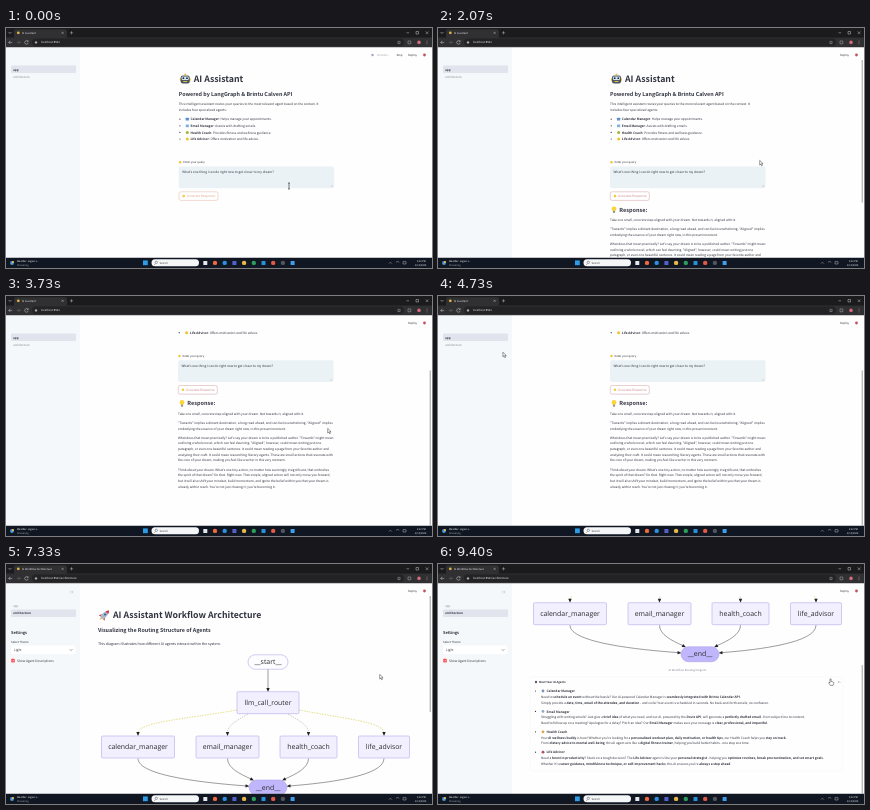
Write an HTML page with a canvas that moves like this. It is 426x240 px and loops after 9.47 s.

```html
<!DOCTYPE html>
<html lang="en">
<head>
<meta charset="utf-8">
<title>AI Assistant</title>
<style>
  html, body { margin: 0; width: 100%; height: 100%; overflow: hidden; background: #fff; }
  canvas { display: block; width: 426px; height: 240px; }
</style>
</head>
<body>
<canvas id="stage"></canvas>
<script>
const LOOP = 9470, STEP = 1000 / 15;
const LINE = 5.68, PARA = 9.2;
const BODY = 3.55, SMALL = 3.1, SUBHEAD = 6, TITLE = 9.76;
const INK = '#31333f', RED = '#ff4b4b', GREY = '#8a8c96';
const UI = '"Noto Sans CJK JP", "Noto Sans CJK SC", "Noto Sans CJK", "Noto Sans", sans-serif';
const GRAPH = '"Open Sans", "Noto Sans", sans-serif';

const canvas = document.getElementById('stage');
const ctx = canvas.getContext('2d');
const ratio = window.devicePixelRatio || 1;
canvas.width = 426 * ratio;
canvas.height = 240 * ratio;

// Moments, in ms
const ANSWER = 1400, OPEN_PAGE = 5100, DIAGRAM = 6400;
const LINK_HOVER = [4700, 6050], PANEL_HOVER = [9100, LOOP];

// Keys are [time, ...values]; values ease between neighbouring keys
const CURSOR = [[0, 283, 158], [700, 283, 158], [1700, 323, 135], [3900, 323, 135],
  [4800, 50, 54], [5950, 50, 54], [7000, 375, 113], [7400, 375, 113], [7900, 394, 118], [9470, 393, 118]];
const SCROLL_CHAT = [[2300, 0], [3400, 74.3]];
const SCROLL_GRAPH = [[7450, 0], [8200, 68], [8500, 68], [9250, 133.3]];

const within = ([from, to], t) => t >= from && t < to;

function at(keys, t) {
  const i = keys.findIndex(k => k[0] > t);
  if (i < 0) return keys[keys.length - 1].slice(1);
  if (i === 0) return keys[0].slice(1);
  const a = keys[i - 1], b = keys[i];
  const u = (t - a[0]) / (b[0] - a[0]), e = u * u * (3 - 2 * u);
  return a.slice(1).map((v, j) => v + (b[j + 1] - v) * e);
}

function rect(x, y, w, h, fill, r = 0, stroke, width = 0.5) {
  ctx.beginPath();
  ctx.roundRect(x, y, w, h, r);
  if (fill) { ctx.fillStyle = fill; ctx.fill(); }
  if (stroke) { ctx.strokeStyle = stroke; ctx.lineWidth = width; ctx.stroke(); }
}

function dot(x, y, r, fill) {
  ctx.beginPath();
  ctx.arc(x, y, r, 0, 7);
  ctx.fillStyle = fill;
  ctx.fill();
}

function path(d, stroke, width = 0.5, dash = []) {
  ctx.strokeStyle = stroke;
  ctx.lineWidth = width;
  ctx.setLineDash(dash);
  ctx.stroke(new Path2D(d));
  ctx.setLineDash([]);
}

function shape(d, fill) {
  ctx.fillStyle = fill;
  ctx.fill(new Path2D(d));
}

// Text centred on its cap height at y; **marks** switch bold
function text(str, x, y, size = BODY, { color = INK, bold = false, font = UI, center = false } = {}) {
  const px = (font === UI ? size * 0.895 : size) * 8;
  ctx.save();
  ctx.translate(x, y + size * 0.33);
  ctx.scale(1 / 8, 1 / 8);
  ctx.fillStyle = color;
  ctx.textRendering = 'geometricPrecision';
  ctx.textAlign = center ? 'center' : 'left';
  let offset = 0;
  str.split('**').forEach((part, i) => {
    ctx.font = `${bold || i % 2 ? 700 : 400} ${px}px ${font}`;
    ctx.fillText(part, offset, 0);
    offset += ctx.measureText(part).width;
  });
  ctx.restore();
}

function lines(list, x, y) {
  list.forEach((s, i) => text(s, x, y + i * LINE));
  return y + (list.length - 1) * LINE + PARA;
}

function robot(x, y) {
  rect(x - 5.5, y - 1.5, 11, 4, '#e8bd3c', 1.5);
  rect(x - 4.5, y - 3.5, 9, 8, '#4b5563', 2);
  rect(x - 3.6, y - 2.4, 7.2, 3.4, '#cfe6f2', 1.2);
  dot(x - 1.8, y - 0.8, 0.9, '#1d2533');
  dot(x + 1.8, y - 0.8, 0.9, '#1d2533');
  rect(x - 2, y + 2, 4, 1, '#e8bd3c');
  dot(x, y - 4.6, 1, '#e8bd3c');
}

function bulb(x, y) {
  dot(x, y - 0.9, 2.4, '#fbd43c');
  rect(x - 1.1, y + 1, 2.2, 2.3, '#9a9a8c', 0.4);
}

function rocket(x, y) {
  ctx.save();
  ctx.translate(x, y);
  ctx.rotate(Math.PI / 4);
  shape('M-2 1L-4 4L-2 4ZM2 1L4 4L2 4Z', '#d8344a');
  shape('M-1 4L0 7L1 4Z', '#f9b233');
  shape('M0-6.5C3-3 2.5 2 2 4.2H-2C-2.5 2-3-3 0-6.5Z', '#aab8c8');
  shape('M0-6.5C1-5.5 1.5-4.5 1.8-3.3H-1.8C-1.5-4.5-1-5.5 0-6.5Z', '#d8344a');
  dot(0, -0.8, 1.1, '#2f6fa8');
  ctx.restore();
}

function arrow(x, y, angle) {
  ctx.save();
  ctx.translate(x, y);
  ctx.rotate(angle);
  shape('M0 0L-4-1.7L-4 1.7Z', '#222');
  ctx.restore();
}

function browser(t) {
  const label = t < DIAGRAM ? 'AI Assistant' : 'AI Workflow Architecture';
  rect(0, 0, 426, 10, '#1b1b1d');
  rect(8, 1.2, 53, 9, '#303032', 2);
  rect(0, 9.5, 426, 9.8, '#303032');
  rect(26, 10.6, 372, 7.4, '#232325', 3.7);
  path('M2.5 4L4 5.5L5.5 4', '#ddd');
  dot(12.3, 4.8, 1.4, '#e3b341');
  text(label, 16, 4.8, 2.9, { color: '#eee' });
  path('M55.6 3.8l2 2m0-2l-2 2M65.5 3.2v3.2m-1.6-1.6h3.2', '#ddd', 0.4);
  path('M400.5 4.8h2.6M410 3.5h2.5v2.5h-2.5zM419.8 3.5l2.5 2.5m0-2.5l-2.5 2.5', '#eee', 0.4);
  path('M6.3 14.4H2.7m1.6-1.6l-1.6 1.6l1.6 1.6', '#ddd', 0.45);
  path('M10.6 14.4h3.6m-1.6-1.6l1.6 1.6l-1.6 1.6', '#777', 0.45);
  path('M22 13.4a1.8 1.8 0 1 0 .2 1.6M22.2 12.4v1.4h-1.4', '#ddd', 0.45);
  dot(30, 14.4, 1.2, '#aaa');
  text('localhost:8501' + (t < OPEN_PAGE ? '' : '/architecture'), 35, 14.4, SMALL, { color: '#eee' });
  path('M393 12.8l.5 1.2h1.2l-1 .8l.4 1.2l-1.1-.7l-1.1.7l.4-1.2l-1-.8h1.2z', '#ddd', 0.3);
  path('M402 13h2.8v2.8h-2.8z', '#ccc', 0.4);
  dot(413, 14.4, 1.8, '#d46a7c');
  for (const y of [12.9, 14.4, 15.9]) dot(421, y, 0.4, '#ddd');
}

function taskbar() {
  rect(0, 229.7, 426, 10.3, '#101722');
  dot(6, 235, 1.9, '#4a9be0');
  dot(7, 234, 1, '#f4c542');
  text('Weather: region a...', 11, 233.2, 2.7, { color: '#fff' });
  text('Streaming', 11, 236.7, 2.7, { color: '#aaa' });
  rect(137, 232.4, 4.8, 4.8, '#2c9be8');
  rect(145.5, 231.3, 47.5, 7, '#f4f6f7', 3.5);
  path('M149.5 235.6l-1.3 1.3M151.5 234.3a1.2 1.2 0 1 1-2.4 0a1.2 1.2 0 1 1 2.4 0', '#333', 0.4);
  text('Search', 153.5, 234.9, 3, { color: '#444' });
  const icons = ['#e4e8ec', '#f06a3a', '#2f8fe0', '#5560c8', '#e6b94a',
    '#2f9e5c', '#2a8fdc', '#e05a45', '#50565f', '#3fa0e8'];
  icons.forEach((c, i) => {
    const x = 199.3 + i * 9.7;
    if (i % 3) dot(x, 234.9, 2.2, c); else rect(x - 2, 232.9, 4, 4, c, 0.5);
  });
  path('M383 235.6l1.4-1.4l1.4 1.4M390 234.2q1.6-1.4 3.2 0M397 233.6h3v2.4h-3z', '#ddd', 0.4);
  text('5:22 PM', 411, 233.2, 2.7, { color: '#fff' });
  text('2/10/2025', 409, 236.7, 2.7, { color: '#fff' });
}

function sidebar(second) {
  rect(0, 19.3, 74, 210.4, '#f4f8fb');
  rect(5, second ? 45.6 : 37.6, 65, 7.4, '#e1e4ec', 1.2);
  text('app', 7, 41.5, 3.3, { bold: !second, color: second ? GREY : INK });
  text('architecture', 7, 49.4, 3.3, { bold: second, color: second ? INK : GREY });
  if (!second) return;
  path('M65.4 26.8l-1.2 1.2l1.2 1.2M67.2 26.8l-1.2 1.2l1.2 1.2', '#999', 0.4);
  text('Settings', 5, 69, 4.44, { bold: true });
  text('Select Theme', 5, 77.6, SMALL);
  rect(5, 81.5, 64.5, 8.8, '#fff', 1.6);
  text('Light', 8, 86);
  path('M63.8 85.3l1.3 1.3l1.3-1.3', INK, 0.45);
  rect(5.2, 94.8, 3.6, 3.6, RED, 0.7);
  path('M6 96.6l.8.8l1.3-1.6', '#fff', 0.5);
  text('Show Agent Descriptions', 11, 96.6, BODY);
}

function header(running) {
  if (running) {
    dot(366.5, 27, 1.2, '#9aa0c8');
    text('RUNNING...', 371, 27.2, 2.7, { color: '#a5a7ae' });
    text('Stop', 390.5, 27.2, SMALL);
  }
  text('Deploy', 402, 27.2, SMALL);
  dot(418.5, 27, 1.4, '#c4525e');
}

// Scrolling part of a page, hidden below the header
function scrolled(offset, height, draw) {
  ctx.save();
  ctx.beginPath();
  ctx.rect(74, 32, 352, 197.7);
  ctx.clip();
  if (height) {
    const k = 210.4 / (210.4 + height);
    rect(423.6, 19.3 + offset * k, 1.4, 210.4 * k, '#b9bbc2', 0.7);
  }
  ctx.translate(0, -offset);
  draw();
  ctx.restore();
}

const ABILITIES = [
  ['#5b8fd0', '**Calendar Manager**: Helps manage your appointments.'],
  ['#7fb2e0', '**Email Manager**: Assists with drafting emails.'],
  ['#a8b23a', '**Health Coach**: Provides fitness and wellness guidance.'],
  ['#f2c230', '**Life Advisor**: Offers motivation and life advice.']
];

const REPLY = [
  ['Take one small, concrete step aligned with your dream. Not towards it, aligned with it.'],
  ['"Towards" implies a distant destination, a long road ahead, and can feel overwhelming. "Aligned" implies',
    'embodying the essence of your dream right now, in this present moment.'],
  ['What does that mean practically? Let\'s say your dream is to be a published author. "Towards" might mean',
    'outlining a whole novel, which can feel daunting. "Aligned", however, could mean writing just one',
    'paragraph, or even one beautiful sentence. It could mean reading a page from your favorite author and',
    'analyzing their craft. It could mean researching literary agents. These are small actions that resonate with',
    'the core of your dream, making you feel like a writer in this very moment.'],
  ['Think about your dream. What\'s one tiny action, no matter how seemingly insignificant, that embodies',
    'the spirit of that dream? Do that. Right now. That simple, aligned action will not only move you forward,',
    'but it will also shift your mindset, build momentum, and ignite the belief within you that your dream is',
    'already within reach. You\'re not just chasing it; you\'re becoming it.']
];

function chatPage(answered) {
  const x = answered ? 172 : 172.7;
  robot(x + 6.5, 51);
  text('AI Assistant', x + 15, 51, TITLE, { bold: true });
  text('Powered by LangGraph & Brintu Calven API', x, 66, SUBHEAD, { bold: true });
  lines(['This intelligent assistant routes your queries to the most relevant agent based on the context. It',
    'includes four specialized agents:'], x, 75.7);
  ABILITIES.forEach(([color, label], i) => {
    const y = 91.2 + i * 6.6;
    dot(x + 1.2, y, 0.6, INK);
    if (i < 2) rect(x + 7, y - 1.4, 3.2, 2.8, color, 0.4); else dot(x + 8.6, y, 1.5, color);
    text(label, x + 11.8, y);
  });
  dot(x + 1.5, 134.3, 1.2, '#f2c230');
  text('Enter your query', x + 4.5, 134.3, SMALL);
  rect(x, 138.5, 155.5, 21.7, '#eaf2f6', 1.8);
  text("What's one thing I can do right now to get closer to my dream?", x + 3.5, 144.3);
  path(`M${x + 152} 159l2-2M${x + 153.2} 159l.8-.8`, '#999', 0.3);
  const tint = answered ? '#c9878c' : '#e0a08c';
  rect(x + 0.3, 163.8, 39, 8.6, '#fff', 1.8, tint, 0.4);
  dot(x + 5, 168.1, 1.3, '#f2c84a');
  text('Generate Response', x + 8, 168.1, BODY, { color: tint });
  if (!answered) return;
  bulb(x + 4, 181.7);
  text('Response:', x + 9.2, 181.7, 6.2, { bold: true });
  REPLY.reduce((y, para) => lines(para, x, y), 191.8);
}

function node(label, cx, cy, w, h, fill, r = 1.2) {
  rect(cx - w / 2, cy - h / 2, w, h, fill, r, '#a898e4', 0.5);
  text(label, cx, cy, 6.9, { font: GRAPH, center: true, color: '#2b2b2b' });
}

function diagram() {
  const dash = [1.4, 1.2], dark = '#3a3a3a';
  path('M262 105V126', dark);
  path('M231 146C180 155 132 158 132 169M293 146C340 155 378 158 378 169', '#d6cc40', 0.65, dash);
  path('M242 150C228 158 221.5 162 221.5 169M282 150C296 158 302.5 162 302.5 169', '#a5a39a', 0.6, dash);
  path('M132 194.5C132 212 200 219 241 222M378 194.5C378 212 322 219 283 222', dark);
  path('M221.5 194.5C221.5 204 234 210 245 215M302.5 194.5C302.5 204 290 210 279 215', dark);
  arrow(262, 128, Math.PI / 2);
  for (const x of [132, 221.5, 302.5, 378]) arrow(x, 172, Math.PI / 2);
  arrow(243.5, 222.2, 0.08);
  arrow(280.5, 222.2, Math.PI - 0.08);
  arrow(248, 216.5, 0.45);
  arrow(276, 216.5, Math.PI - 0.45);
  node('__start__', 262, 98, 40, 14.5, '#fdfcff', 7.2);
  node('llm_call_router', 262, 138.7, 62, 22, '#f2f0ff');
  node('calendar_manager', 132, 183, 73, 22, '#f2f0ff');
  node('email_manager', 221.5, 183, 63, 22, '#f2f0ff');
  node('health_coach', 302.5, 183, 57, 22, '#f2f0ff');
  node('life_advisor', 378, 183, 51, 22, '#f2f0ff');
  node('__end__', 262, 223.5, 38, 15, '#bfb6fc', 7.5);
}

const AGENTS = [
  ['Calendar Manager', '#7d93b8',
    'Need to **schedule an event** without the hassle? Our AI-powered Calendar Manager is **seamlessly integrated with Brintu Calendar API**.',
    'Simply provide a **date, time, email of the attendee, and duration** - and voila! Your event is scheduled in seconds. No back-and-forth emails, no confusion.'],
  ['Email Manager', '#8fa6c4',
    'Struggling with writing emails? Just give a **brief idea** of what you need, and our AI, powered by the **Dovix API**, will generate a **perfectly drafted email** - from subject line to content.',
    'Need to follow up on a meeting? Apologize for a delay? Pitch an idea? Our **Email Manager** makes sure your message is **clear, professional, and impactful**.'],
  ['Health Coach', '#d9a441',
    "Your **AI wellness buddy** is here! Whether you're looking for a **personalized workout plan, daily motivation, or health tips**, our Health Coach helps you **stay on track**.",
    'From **dietary advice to mental well-being**, this AI agent acts like a **digital fitness trainer**, helping you build better habits - one step at a time.'],
  ['Life Advisor', '#b0505a',
    'Need a **boost in productivity**? Stuck on a tough decision? The **Life Advisor** agent is like your **personal strategist** - helping you **optimize routines, break procrastination, and set smart goals**.',
    "Whether it's **career guidance, mindfulness technique, or self-improvement hacks**, this AI ensures you're **always a step ahead**."]
];

function graphPage(loaded) {
  rocket(98.5, 51);
  text('AI Assistant Workflow Architecture', 107, 51, TITLE, { bold: true });
  text('Visualizing the Routing Structure of Agents', 92, 66, SUBHEAD, { bold: true });
  text('This diagram illustrates how different AI agents interact within the system.', 92, 79.7, 4);
  if (!loaded) return;
  diagram();
  text('AI Workflow Routing Diagram', 249.5, 239.2, SMALL, { color: GREY, center: true });
  rect(92, 246.2, 313, 94, null, 1.8, '#eeeff2', 0.3);
  dot(98, 251.3, 1.2, '#6b5070');
  text('Meet Your AI Agents', 101, 251.3, SMALL, { bold: true });
  path('M399.8 252l1.2-1.2l1.2 1.2', INK, 0.4);
  AGENTS.forEach(([name, color, ...body], i) => {
    const y = 260.3 + i * 20.4;
    dot(97.5, y, 0.6, INK);
    dot(105, y, 1.4, color);
    text(name, 108.5, y, BODY, { bold: true });
    lines(body, 103, y + LINE);
  });
}

function cursor(t) {
  const [x, y] = at(CURSOR, t);
  const hand = within(LINK_HOVER, t) || within(PANEL_HOVER, t);
  const d = hand
    ? 'M-1-3q.8-.6 1.1 0V-.6l2.2.6q.6.4.4 1.4l-.6 2H-.7L-2.3 1q0-.8.8-.5l.5.4Z'
    : 'M-1.3-2.6V2l1.1-1l.8 1.8l.8-.4l-.8-1.7h1.5Z';
  ctx.save();
  ctx.translate(x, y);
  if (y > 144) path('M-1-3H1M0-3V3M-1 3H1', '#222', 0.6);
  else { shape(d, '#fff'); path(d, '#222', 0.45); }
  ctx.restore();
}

function draw(t) {
  const second = t >= OPEN_PAGE, answered = t >= ANSWER, loaded = t >= DIAGRAM;
  ctx.setTransform(ratio, 0, 0, ratio, 0, 0);
  rect(0, 0, 426, 240, '#fefefe');
  sidebar(second);
  if (second) scrolled(at(SCROLL_GRAPH, t)[0], loaded ? 133.3 : 0, () => graphPage(loaded));
  else scrolled(at(SCROLL_CHAT, t)[0], answered ? 74.3 : 0, () => chatPage(answered));
  header(!answered);
  browser(t);
  if (within(LINK_HOVER, t)) {
    rect(0, 224, 35, 5.7, '#2b2b2c', 0.8);
    text('localhost:8501/architecture', 1.5, 226.9, 2.8, { color: '#ddd' });
  }
  taskbar();
  cursor(t);
}

const start = performance.now();
function tick() {
  const t = (performance.now() - start) % LOOP;
  draw(Math.floor(t / STEP) * STEP);
  requestAnimationFrame(tick);
}
tick();
</script>
</body>
</html>
```
